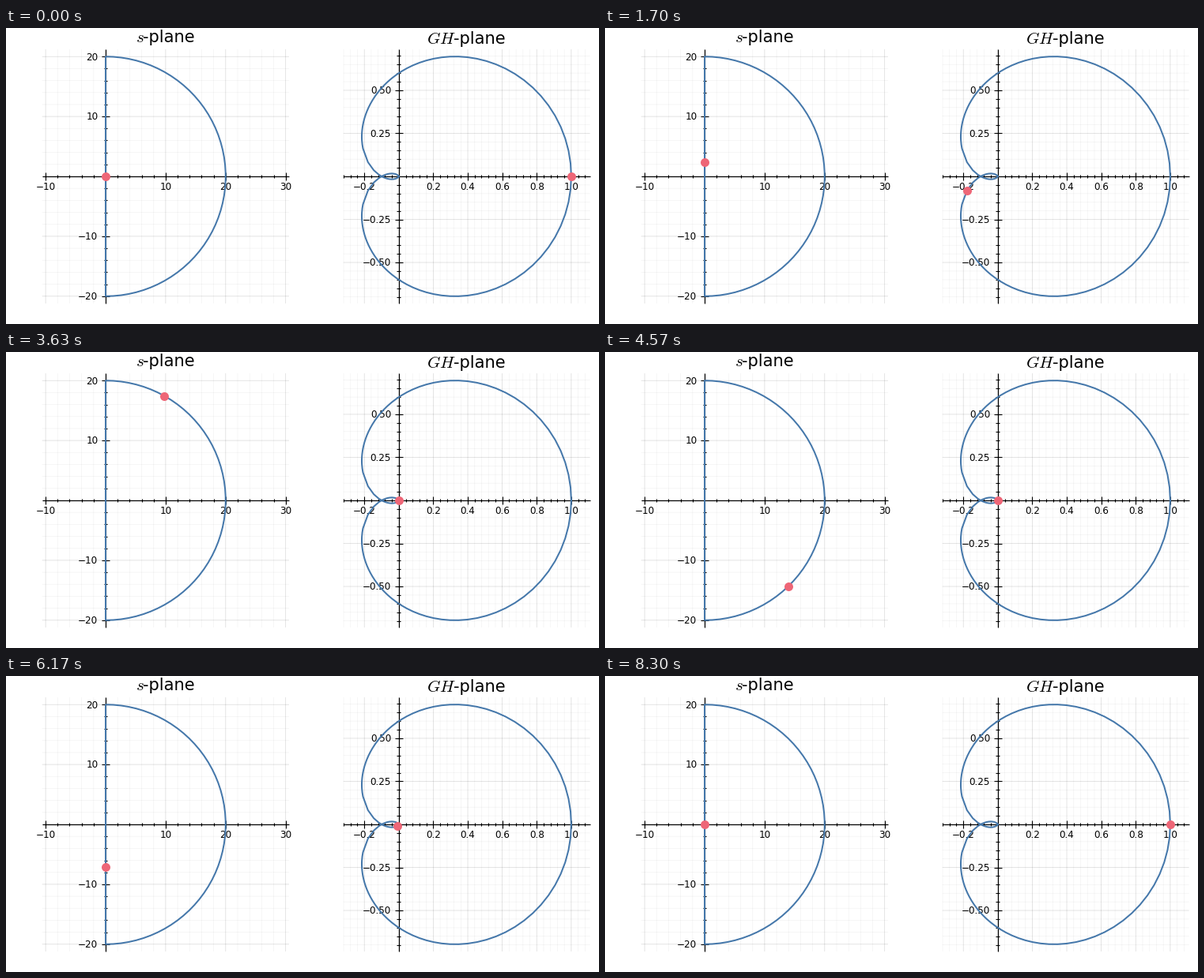
A matplotlib script that plays this animation: 750x375 px, repeating every 8.33 s.

```python
import matplotlib.pyplot as plt
import numpy as np
from matplotlib.animation import FuncAnimation
from matplotlib.collections import LineCollection

W, H, DPI = 750, 375, 100
PX = 72 / DPI  # points per pixel
BLUE, PINK = "#4477AA", "#EE6677"
LEG = 50  # samples per leg of the contour
TOP, BOTTOM = 27, 349

plt.rcParams["font.family"] = "DejaVu Sans"
plt.rcParams["mathtext.fontset"] = "cm"

fig = plt.figure(figsize=(W / DPI, H / DPI), dpi=DPI, facecolor="white")
ax = fig.add_axes([0, 0, 1, 1])
ax.set(xlim=(0, W), ylim=(H, 0))
ax.axis("off")


def contour():
    """Up the imaginary axis, round the arc, and back to zero."""
    slow = 1j * np.linspace(0, 2, LEG)
    fast = 1j * np.linspace(2, 20, LEG)
    arc = 20 * np.exp(1j * np.linspace(np.pi / 2, -np.pi / 2, LEG))
    return np.concatenate([slow, fast, arc, -fast[::-1], -slow[::-1]])


def loop_gain(s):
    return 6 / ((s + 1) * (s + 2) * (s + 3))


def add_lines(segments, width, alpha=1.0, snap=None, z=1):
    ax.add_collection(LineCollection(segments, colors="black", alpha=alpha,
                                     linewidths=width * PX, snap=snap, zorder=z))


def add_text(x, y, text, size, ha):
    ax.text(x, y, text, fontsize=size * PX, ha=ha, va="baseline", zorder=3)


class Plane:
    def __init__(self, x0, y0, scale, left, right):
        self.x0, self.y0, self.scale = x0, y0, scale
        self.left, self.right = left, right

    def to_px(self, z):
        return self.x0 + self.scale * z.real, self.y0 - self.scale * z.imag

    def ticks(self, step, lo, hi):
        """Multiples of step, as pixel offsets, that fit between lo and hi."""
        k = np.arange(np.ceil(lo / self.scale / step),
                      np.floor(hi / self.scale / step) + 1)
        return k[k != 0] * step

    def draw_axes(self, xstep, ystep, fmt_x, fmt_y):
        x0, y0 = self.x0, self.y0
        add_lines([[(self.left, y0), (self.right, y0)],
                   [(x0, TOP), (x0, BOTTOM)]], 1.2, z=2)
        for div, reach, alpha in ((1, 4.8, 0.1), (5, 2.4, 0.05)):
            tx = self.ticks(xstep / div, self.left - x0, self.right - x0)
            ty = self.ticks(ystep / div, y0 - BOTTOM, y0 - TOP)
            px = x0 + self.scale * tx
            py = y0 - self.scale * ty
            add_lines([[(x, TOP), (x, BOTTOM)] for x in [*px, x0]]
                      + [[(self.left, y), (self.right, y)] for y in [*py, y0]],
                      0.7, alpha, snap=False)
            add_lines([[(x, y0 - reach), (x, y0 + reach)] for x in px]
                      + [[(x0 - reach, y), (x0 + reach, y)] for y in py],
                      1.1, z=2)
            if div == 1:
                for x, v in zip(px, tx):
                    add_text(x, y0 + 17.3, self.label(v, fmt_x), 12, "center")
                for y, v in zip(py, ty):
                    add_text(x0 - 9.7, y + 4.4, self.label(v, fmt_y), 12, "right")

    @staticmethod
    def label(value, fmt):
        return format(value, fmt).replace("-", "\u2212")

    def draw_curve(self, z):
        self.path = np.column_stack(self.to_px(z))
        ax.plot(*self.path.T, color=BLUE, lw=2 * PX, solid_joinstyle="round",
                snap=False, zorder=4)
        self.dot, = ax.plot([], [], "o", color=PINK, ms=11 * PX, mew=0, zorder=5)

    def move(self, i):
        x, y = self.path[i]
        self.dot.set_data([x], [y])
        return self.dot


s = contour()
s_plane = Plane(126, 188, 7.59, 45.7, 358)
gh_plane = Plane(496.8, 188, 218.1, 426.7, 738.6)

s_plane.draw_axes(10, 10, ".0f", ".0f")
gh_plane.draw_axes(0.2, 0.25, ".1f", ".2f")
s_plane.draw_curve(s)
gh_plane.draw_curve(loop_gain(s))

for x_math, x_word, base, name in ((164, 173.5, 18, "$s$"),
                                   (532, 566.3, 20.3, "$GH$")):
    add_text(x_math, base, name, 21, "left")
    add_text(x_word, base, "-plane", 21, "left")


def update(i):
    return s_plane.move(i), gh_plane.move(i)


anim = FuncAnimation(fig, update, frames=len(s), interval=8330 / len(s),
                     repeat=True, repeat_delay=0)
plt.show()
```
